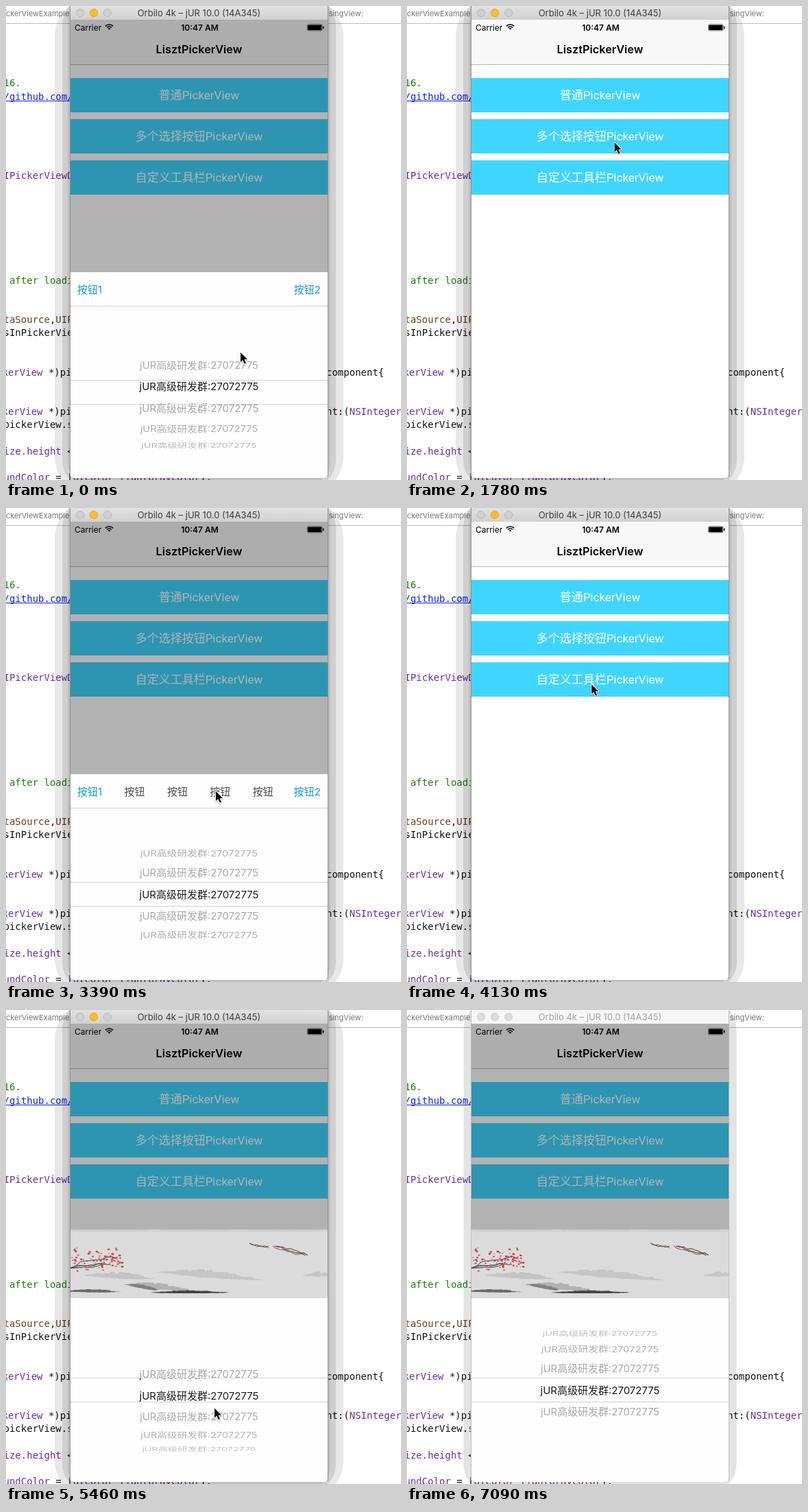
Recreate the animation shown at these times as an HTML page with a canvas. Size 576 by 691 pixels, loop 7120 ms.

```html
<!DOCTYPE html>
<html lang="zh">
<head>
<meta charset="utf-8">
<title>LisztPickerView</title>
<style>
  html, body { margin: 0; width: 100%; height: 100%; overflow: hidden; background: #fff; }
  canvas { display: block; }
</style>
</head>
<body>
<canvas id="stage" width="576" height="691"></canvas>
<script>
const ctx = document.getElementById('stage').getContext('2d');
const LOOP = 7120, STEP = 147.5, ROUND = 16 * STEP;
const LEFT = 94, WIDTH = 375, RIGHT = LEFT + WIDTH, MID = LEFT + WIDTH / 2, BOTTOM = 688;
const CJK = '"Noto Sans CJK SC", "Noto Sans CJK", sans-serif';
const UI = 'Inter, ' + CJK;
const ROW_TEXT = 'jUR高级研发群:27072775';
const ROWS = 5, RADIUS = 100, ROW_ANGLE = 0.32;

// Places the pointer visits: [step, x, y]
const STOPS = [
  [0, 342, 505], [7, 443, 410], [14, 298, 192], [16, 335, 442], [18, 335, 580], [23, 306, 413],
  [30, 268, 252], [32, 197, 424], [34, 107, 5], [36, 290, 590], [42, 415, 505], [45, 541, 678]
];

function ease(t, start, duration) {
  const v = Math.max(0, Math.min(1, (t - start) / duration));
  return v * v * (3 - 2 * v);
}

// The pointer glides to each stop and rests there briefly.
function pointerAt(step) {
  const next = Math.max(1, STOPS.findIndex(stop => stop[0] >= step));
  const [from, x0, y0] = STOPS[next - 1], [to, x1, y1] = STOPS[next];
  const mix = ease(step, from, (to - from) * 0.8);
  return [x0 + (x1 - x0) * mix, y0 + (y1 - y0) * mix];
}

function pickerPosition(kind, step) {
  if (kind === 0) return 1.25 + 0.75 * ease(step, 0, 2);
  if (kind === 1) return 2 * ease(step, 18, 3);
  return ease(step, 35, 3) + 2 * ease(step, 39, 3);
}

function seeded(seed) {
  return () => (seed = (seed * 16807) % 2147483647) / 2147483647;
}

function box(x, y, w, h, color) {
  ctx.fillStyle = color;
  ctx.fillRect(x, y, w, h);
}

function round(x, y, w, h, radii, color) {
  ctx.fillStyle = color;
  ctx.beginPath();
  ctx.roundRect(x, y, w, h, radii);
  ctx.fill();
}

function text(str, x, y, font, color, align = 'left') {
  ctx.font = font;
  ctx.fillStyle = color;
  ctx.textAlign = align;
  ctx.fillText(str, x, y);
}

function clipped(rects, draw) {
  ctx.save();
  ctx.beginPath();
  rects.forEach(r => ctx.roundRect(...r));
  ctx.clip();
  draw();
  ctx.restore();
}

// Segments alternate text and color.
function codeLine(x, y, ...segments) {
  for (let i = 0; i < segments.length; i += 2) {
    text(segments[i], x, y, '14px "DejaVu Sans Mono", monospace', segments[i + 1]);
    x += ctx.measureText(segments[i]).width;
  }
}

function drawEditor() {
  const green = '#1d7d0c', blue = '#0b24fb', purple = '#6a2fa0', brown = '#6b3f1d', black = '#111';
  const x = -3.5, right = 467;
  box(0, 0, 576, 691, '#fff');
  box(0, 25, 576, 1, '#bcbcbc');
  text('ckerViewExample', 0, 15, '11px ' + UI, '#777');
  text('usingView:', 521, 15, '11px ' + UI, '#777', 'right');
  codeLine(x, 117, '16.', green);
  codeLine(x, 137, '/github.com/', blue);
  box(0, 138, 96, 1, blue);
  codeLine(x, 252, 'IPickerViewD', purple);
  codeLine(x, 405, ' after loadi', green);
  codeLine(x, 462, 'taSource', brown, ',', black, 'UIP', brown);
  codeLine(x, 481, 'sInPickerView', black);
  for (const y of [539, 596]) codeLine(x - 2, y, 'kerView', purple, ' *)pic', black);
  codeLine(right, 539, 'component{', black);
  codeLine(right, 596, 'nt:(', black, 'NSInteger', purple);
  codeLine(x, 615, 'pickerView.', black, 's', purple);
  codeLine(x, 654, 'ize.height', purple, ' <', black);
  codeLine(x, 692, 'undColor', purple, ' = [', black, 'UIColor lightGrayColor', purple, '];', black);
}

function drawWindow(active) {
  const shadow = (spread, alpha) =>
    round(LEFT - spread, -14, WIDTH + 2 * spread, 706 + spread, 24 + spread * 1.5, `rgba(0,0,0,${alpha})`);
  if (active) {
    shadow(23, 0.09);
    shadow(12, 0.11);
    shadow(4, 0.08);
  } else {
    shadow(11.5, 0.11);
  }
  box(LEFT - 1, 0, WIDTH + 2, 686, active ? '#8f8f8f' : '#bbb');
  const bar = ctx.createLinearGradient(0, 0, 0, 20);
  bar.addColorStop(0, active ? '#e2e2e2' : '#f6f6f6');
  bar.addColorStop(1, active ? '#d0d0d0' : '#f6f6f6');
  box(LEFT, 0, WIDTH, 20, bar);
  for (let i = 0; i < 3; i++) {
    const yellow = active && i === 1;
    ctx.beginPath();
    ctx.arc(108 + i * 20, 10, 5.7, 0, Math.PI * 2);
    ctx.fillStyle = yellow ? '#fdbc25' : active ? '#cfcfcf' : '#dcdcdc';
    ctx.strokeStyle = yellow ? '#dfa023' : active ? '#b4b4b4' : '#cdcdcd';
    ctx.lineWidth = 0.8;
    ctx.fill();
    ctx.stroke();
  }
  text('Orbilo 4k – jUR 10.0 (14A345)', MID, 15, '13px ' + UI, active ? '#3c3c3c' : '#a4a4a4', 'center');
}

function drawStatusBar() {
  text('Carrier', 100, 35.5, '12px ' + UI, '#000');
  text('10:47 AM', 282.5, 35.5, '600 12px ' + UI, '#000', 'center');
  ctx.strokeStyle = '#000';
  ctx.lineWidth = 1.6;
  for (let r = 2; r <= 8; r += 3) {
    ctx.beginPath();
    ctx.arc(150.5, 35, r, -Math.PI * 0.75, -Math.PI * 0.25);
    ctx.stroke();
  }
  ctx.lineWidth = 0.6;
  ctx.beginPath();
  ctx.roundRect(439.4, 26.9, 21.6, 9, 2);
  ctx.stroke();
  round(440.3, 27.8, 19.8, 7.2, 1, '#000');
  round(462, 29.5, 1.4, 4, 0.7, '#000');
}

function drawApp() {
  box(LEFT, 20, WIDTH, 668, '#fff');
  box(LEFT, 20, WIDTH, 65, '#f8f8f8');
  box(LEFT, 85, WIDTH, 1, '#b8b8b8');
  drawStatusBar();
  text('LisztPickerView', MID, 69, '600 16.3px ' + UI, '#000', 'center');
  ['普通', '多个选择按钮', '自定义工具栏'].forEach((name, i) => {
    const y = 105 + i * 60;
    box(LEFT, y, WIDTH, 50, '#40d5ff');
    text(name + 'PickerView', MID, y + 31, '17px Roboto, ' + CJK, '#fff', 'center');
  });
}

// Rows sit on a turning drum: sine gives height, cosine gives foreshortening.
function pickerRows(center, position, colorAt) {
  for (let i = 0; i < ROWS; i++) {
    const angle = (i - position) * ROW_ANGLE, depth = Math.cos(angle);
    ctx.save();
    ctx.translate(MID, center + RADIUS * Math.sin(angle));
    ctx.scale(0.91 + 0.09 * depth, depth);
    text(ROW_TEXT, 0, 5.5, '15px ' + UI, colorAt(depth), 'center');
    ctx.restore();
  }
}

function drawPicker(center, position) {
  clipped([[LEFT, center - 110, WIDTH, 93], [LEFT, center + 18, WIDTH, 80]], () =>
    pickerRows(center, position, depth => `rgba(0,0,0,${0.35 * Math.sqrt(depth)})`));
  clipped([[LEFT, center - 17, WIDTH, 34]], () => pickerRows(center, position, () => '#1c1c1c'));
  for (const y of [center - 18, center + 17]) box(LEFT, y, WIDTH, 1, '#d2d2d2');
}

function drawButtons(many, pressed) {
  const font = '15px ' + UI, blue = '#149bdc';
  text('按钮1', 104, 418.5, font, blue);
  text('按钮2', 459, 418.5, font, pressed ? '#ee0a0a' : blue, 'right');
  if (many) for (let i = 0; i < 4; i++) text('按钮', 172.5 + i * 62.4, 418.5, font, '#4c4c4c');
  box(LEFT, 437, WIDTH, 1, '#d2d2d2');
}

// A ragged brush mark, thickest in the middle and sinking to the right.
function wash(x, y, length, height, drop, gray, random) {
  ctx.fillStyle = `rgb(${gray},${gray},${gray})`;
  for (let i = 0; i < length; i += 2) {
    const u = i / length, swell = height * Math.sin(Math.PI * u) * (0.4 + random() * 0.6);
    ctx.fillRect(x + i, y + drop * u - swell, 3 + random() * 9, swell * 1.3);
  }
}

// A thin branch that wanders around its heading.
function twig(x, y, length, heading, width, color, random) {
  ctx.strokeStyle = color;
  ctx.lineWidth = width;
  ctx.beginPath();
  ctx.moveTo(x, y);
  for (let run = 0; run < length; run += 6) {
    const angle = heading + random() - 0.5;
    ctx.lineTo(x += 6 * Math.cos(angle), y += 6 * Math.sin(angle));
  }
  ctx.stroke();
}

function drawPainting() {
  const random = seeded(71);
  box(LEFT, 320, WIDTH, 100, '#dbdbdb');
  clipped([[LEFT, 320, WIDTH, 100]], () => {
    for (let x = LEFT - 20; x < RIGHT; x += 125) wash(x, 322, 150, 4, 0, 205, random);
    wash(112, 387, 95, 8, 5, 196, random);
    wash(218, 382, 150, 9, 12, 198, random);
    wash(430, 387, 50, 6, 0, 198, random);
    wash(170, 400, 95, 8, 10, 178, random);
    wash(172, 400, 45, 4, 9, 130, random);
    wash(84, 410, 75, 4, 1, 105, random);
    wash(208, 412, 110, 3.5, 0, 70, random);

    for (let i = 0; i < 4; i++) twig(LEFT, 376, 48 + 6 * i, -0.14 * i, 1, '#444', random);
    for (let i = 0; i < 90; i++) {
      const x = LEFT + random() * 74, y = 362 + (random() + random() - 1) * 19;
      const size = 0.8 + random() * 1.6;
      box(x, y, size * 1.5, size, i % 3 ? '#d34650' : '#a8404a');
    }
    for (let i = 0; i < 2; i++) twig(355, 340, 26, 0.1 * i, 1, '#5a4a40', random);
    for (let i = 0; i < 3; i++) twig(389 + 3 * i, 344, 44, 0.2 + 0.06 * i, 1.1, i ? '#5d4a3b' : '#8b6b50', random);
  });
}

function drawSheet(kind, slide, position, pressed) {
  const painted = kind === 2, top = painted ? 320 : 388;
  ctx.save();
  ctx.translate(0, slide * (BOTTOM - top));
  box(LEFT, top, WIDTH, BOTTOM - top, '#fefefe');
  if (painted) drawPainting();
  else drawButtons(kind === 1, pressed);
  drawPicker(painted ? 554 : 563, position);
  ctx.restore();
}

function drawPointer(x, y) {
  ctx.save();
  ctx.translate(x, y);
  const arrow = new Path2D('M0 0V14L3.2 11L5.7 16.6L8 15.6L5.6 10.2L10 10Z');
  ctx.lineJoin = 'round';
  ctx.lineWidth = 2;
  ctx.strokeStyle = '#fff';
  ctx.shadowColor = 'rgba(0,0,0,.35)';
  ctx.shadowBlur = 2;
  ctx.shadowOffsetY = 1;
  ctx.stroke(arrow);
  ctx.shadowColor = 'transparent';
  ctx.fillStyle = '#000';
  ctx.fill(arrow);
  ctx.restore();
}

function draw(elapsed) {
  const step = Math.floor((elapsed % LOOP + 10) / STEP), time = step * STEP;
  // Each round shows the next kind of sheet; the last one stays open.
  const kind = Math.min(2, Math.floor((step + 5) / 16));
  const shown = ease(time, 2025 + ROUND * (kind - 1), 200);
  const hidden = kind < 2 ? ease(time, 1150 + ROUND * kind, 200) : 0;
  const open = shown - hidden;

  drawEditor();
  drawWindow(step < 48);
  clipped([[LEFT, 20, WIDTH, BOTTOM - 20, [0, 0, 5, 5]]], () => {
    drawApp();
    box(LEFT, 20, WIDTH, 668, `rgba(0,0,0,${0.3 * open})`);
    if (open > 0) drawSheet(kind, 1 - open, pickerPosition(kind, step), step === 7);
  });
  if (step < 46) drawPointer(...pointerAt(step));
}

const start = performance.now();
function tick() {
  draw(performance.now() - start);
  requestAnimationFrame(tick);
}
tick();
</script>
</body>
</html>
```
